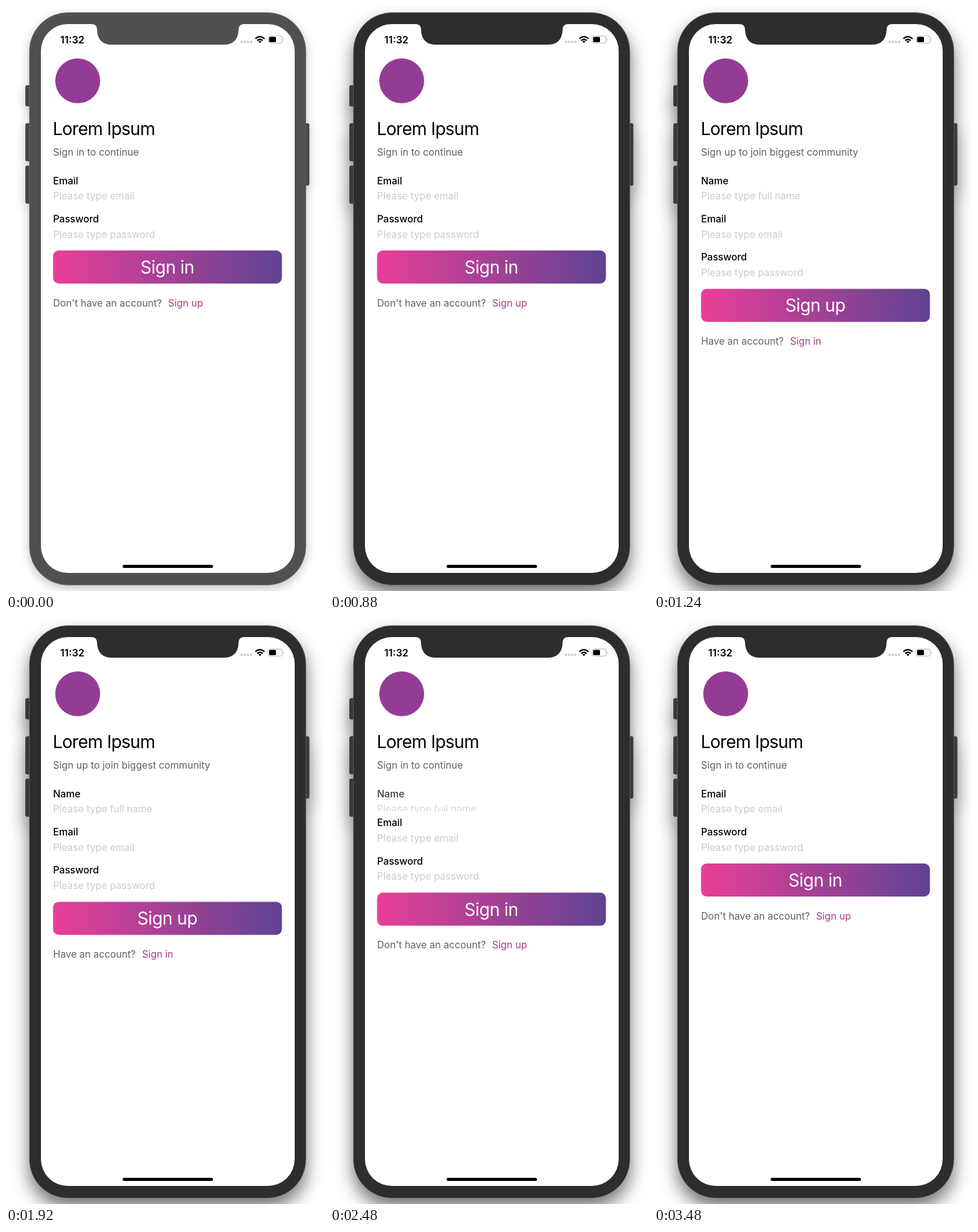
An HTML page that plays this animation: 510x938 px, repeating every 3520 ms.

```html
<!DOCTYPE html>
<html lang="en">
<head>
<meta charset="utf-8">
<title>Sign in and sign up</title>
<style>
  html, body { margin: 0; height: 100%; overflow: hidden; background: #fff; }
  svg { display: block; width: 100vw; height: 100vh; }
  text { font: 400 15.7px Inter, sans-serif; fill: #000; white-space: pre; }
  .label { font-weight: 500; }
  .hint { fill: #cbcbcd; }
  .note { fill: #606062; }
  .link { fill: #a9388f; }
  .title { font-size: 28px; letter-spacing: -.75px; }
  .action { font-size: 28px; letter-spacing: -.5px; fill: #fff; text-anchor: middle; }
  .time { font-size: 16px; font-weight: 600; }
  #phone { fill: #505050; filter: drop-shadow(0 5px 8px rgba(0, 0, 0, .24)); }
  #phone .keys { fill: #464646; }
  #phone.active { fill: #2d2d2d; filter: drop-shadow(0 15px 14px rgba(0, 0, 0, .55)); }
  #phone.active .keys { fill: #3a3a3a; }
</style>
</head>
<body>
<svg viewBox="0 0 510 938">
  <defs>
    <linearGradient id="pink">
      <stop stop-color="#e93f98"/>
      <stop offset="1" stop-color="#5f4392"/>
    </linearGradient>
    <clipPath id="reveal"><rect id="revealBox" x="70" y="261.5" width="380" height="0"/></clipPath>
  </defs>

  <g id="phone">
    <g class="keys">
      <rect x="31" y="127" width="10" height="34" rx="3"/>
      <rect x="31" y="188" width="10" height="61" rx="3"/>
      <rect x="31" y="256" width="10" height="61" rx="3"/>
      <rect x="476" y="188" width="10.5" height="100" rx="3"/>
    </g>
    <rect x="37.5" y="10.5" width="443.5" height="918" rx="62" stroke="#777" stroke-opacity=".6"/>
  </g>
  <rect x="56" y="29" width="407" height="880" rx="43" fill="#fff"/>
  <path id="notch" d="M137 28.5V29Q146 29 146 38Q147 62 170 62H349Q372 62 373 38Q373 29 382 29V28.5Z" fill="#505050"/>

  <text class="time" x="87" y="59.5">11:32</text>
  <g fill="#ccc">
    <circle cx="378" cy="57.5" r="2"/><circle cx="383" cy="57.5" r="2"/>
    <circle cx="388" cy="57.5" r="2"/><circle cx="393" cy="57.5" r="2"/>
  </g>
  <g fill="none" stroke="#000" stroke-width="2.2">
    <path d="M400 52.5Q407 45.700 414.500 52.500M402.800 55.500Q407.200 51.500 411.700 55.500"/>
    <path d="M407.200 59.500L404.800 57Q407.200 55 409.600 57Z" fill="#000" stroke="none"/>
  </g>
  <rect x="420.500" y="48" width="22.500" height="11.500" rx="3.200" fill="none" stroke="#b5b5b5"/>
  <rect x="422" y="49.500" width="11" height="8.500" rx="1.500"/>
  <path d="M444.300 51.700Q446.500 53.700 444.300 55.800Z" fill="#b5b5b5"/>

  <circle cx="115" cy="120" r="36" fill="#943c95"/>
  <text class="title" x="75" y="207">Lorem Ipsum</text>
  <text class="note" id="subtitle" x="75.500" y="239.500"></text>

  <g clip-path="url(#reveal)">
    <g id="nameField">
      <text class="label" x="75.500" y="285.500">Name</text>
      <text class="hint" x="75.500" y="310.300">Please type full name</text>
    </g>
  </g>

  <g id="form">
    <text class="label" x="75.500" y="285.500">Email</text>
    <text class="hint" x="75.500" y="310.300">Please type email</text>
    <text class="label" x="75.500" y="346.700">Password</text>
    <text class="hint" x="75.500" y="371.500">Please type password</text>
    <rect x="75.500" y="392" width="367" height="53" rx="9" fill="url(#pink)"/>
    <text class="action" id="action" x="258.700" y="429"></text>
    <text class="note" x="75.500" y="481.500"><tspan id="question"></tspan><tspan class="link" id="link" dx="10"></tspan></text>
  </g>
  <rect x="187" y="896" width="145" height="5" rx="2.500"/>
</svg>

<script>
  const LOOP = 3520, ACTIVATE = 600, OPEN = 942, CLOSE = 2393, DURATION = 275, FIELD = 61.4;
  const $ = id => document.getElementById(id);

  const signIn = {
    subtitle: "Sign in to continue", action: "Sign in",
    question: "Don't have an account?", link: "Sign up"
  };
  const signUp = {
    subtitle: "Sign up to join biggest community", action: "Sign up",
    question: "Have an account?", link: "Sign in"
  };
  let shown;

  function ease(elapsed) {
    const x = Math.min(1, Math.max(0, elapsed / DURATION));
    return x * x * (3 - 2 * x);
  }

  function showTexts(texts) {
    if (texts === shown) return;
    shown = texts;
    for (const id in texts) $(id).textContent = texts[id];
  }

  function draw(now) {
    const t = now % LOOP;
    const open = ease(t - OPEN) - ease(t - CLOSE);
    const active = t >= ACTIVATE;

    $("phone").classList.toggle("active", active);
    $("notch").setAttribute("fill", active ? "#2d2d2d" : "#505050");
    showTexts(t >= OPEN && t < CLOSE ? signUp : signIn);

    $("revealBox").setAttribute("height", open * FIELD);
    $("nameField").setAttribute("opacity", open);
    $("form").setAttribute("transform", `translate(0 ${open * FIELD})`);
  }

  let start;
  function tick(now) {
    start ??= now;
    draw(now - start);
    requestAnimationFrame(tick);
  }
  draw(0);
  requestAnimationFrame(tick);
</script>
</body>
</html>
```
